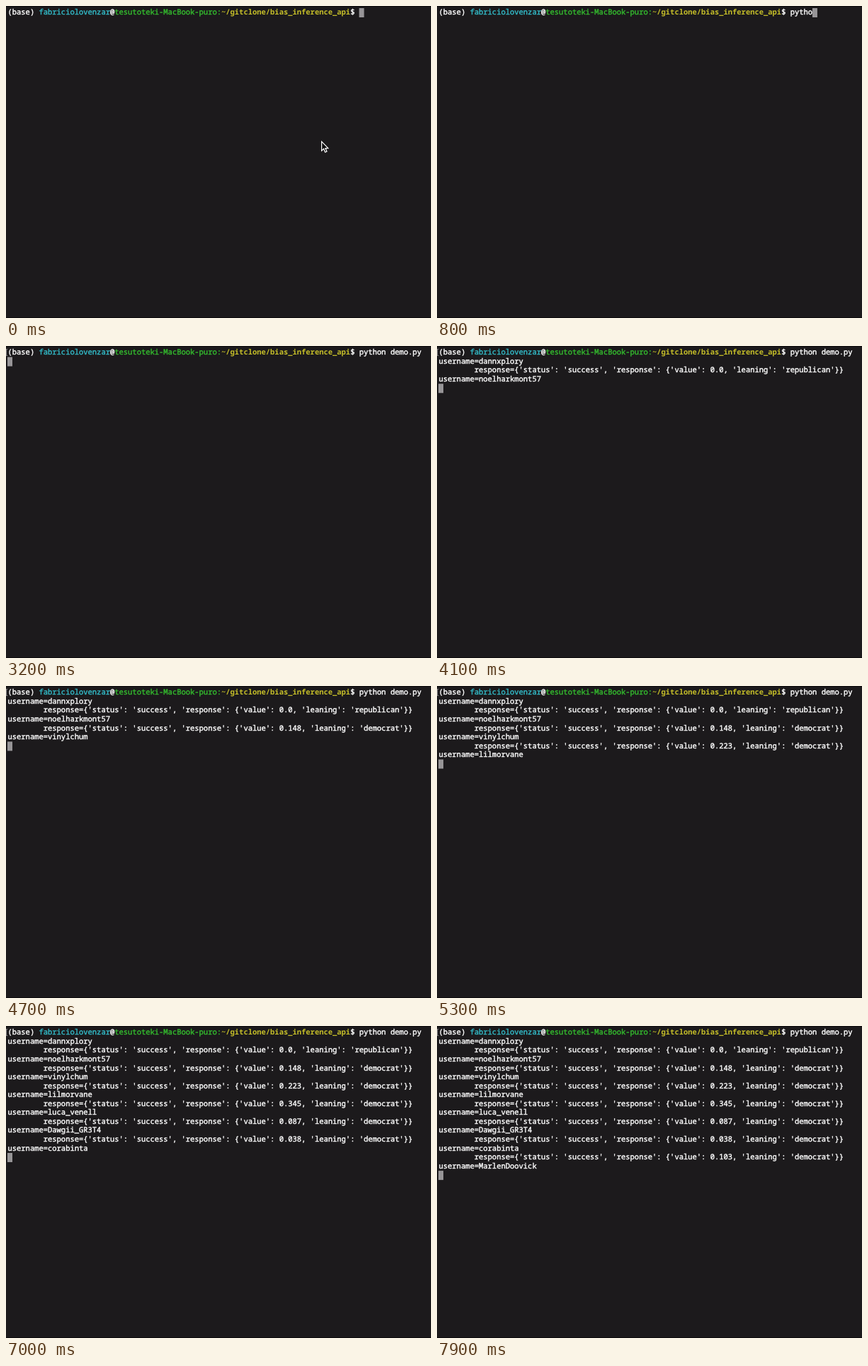
Animation of 600x440 px, one loop 8 s. Source, as an HTML page:

```html
<!DOCTYPE html>
<html lang="en">
<head>
<meta charset="utf-8">
<title>Terminal demo</title>
<style>
  html, body { margin: 0; width: 100%; height: 100%; overflow: hidden; background: #1c1a1c; }
  #stage {
    position: relative; width: 600px; height: 440px; overflow: hidden;
    background: #1c1a1c; box-shadow: inset 0 1px #0c0b0c, inset 0 -1px #0c0b0c;
  }
  pre {
    position: absolute; left: 2.5px; top: 3.3px; margin: 0;
    font: 400 10.475px/12.57px "Noto Sans Mono", "DejaVu Sans Mono", monospace;
    color: #fff; -webkit-text-stroke: .4px; text-rendering: geometricPrecision;
    font-kerning: none; font-variant-ligatures: none;
  }
  .user { color: #33bbc8; }
  .host { color: #34bc2e; }
  .path { color: #c5be29; font-weight: 700; -webkit-text-stroke: 0; }
  #cursor {
    position: absolute; left: 2.2px; top: 2.7px;
    width: 6.7px; height: 13px; background: #979597;
  }
  svg { position: absolute; left: 0; top: 0; }
</style>
</head>
<body>
<div id="stage">
  <div id="cursor"></div>
  <pre>(base) <span class="user">fabriciolovenzar</span>@<span class="host">tesutoteki-MacBook-puro:</span><span class="path">~/gitclone/bias_inference_api</span>$ <span id="typed"></span>
<span id="out"></span></pre>
  <svg width="600" height="440" fill="none">
    <path id="mark" d="M2.2 4.5H.5V13.5H2.2" stroke="#8d8b8d"/>
    <path id="pointer" d="M445.6 191.2V204.2L448.6 201.4L450.6 206.2L452.9 205.2L450.9 200.6H454.8Z"
      fill="#0b0a0b" stroke="#fff" stroke-width="1.2"/>
  </svg>
</div>
<script>
const LOOP = 8000, ENTER = 3200, PROMPT_COLS = 79;
const CW = 6.285, LH = 12.57;
const COMMAND = "python demo.py";

// [time, characters typed]
const KEYS = [
  [200, 1], [400, 2], [600, 3], [700, 4], [800, 5], [900, 6], [1000, 7],
  [1300, 8], [1400, 10], [1500, 11], [1900, 12], [2600, 13], [2900, 14]
];

// [time the name is printed, name, value, leaning]
const USERS = [
  [3600, "dannxplory", "0.0", "republican"],
  [3900, "noelharkmont57", "0.148", "democrat"],
  [4600, "vinylchum", "0.223", "democrat"],
  [5300, "lilmorvane", "0.345", "democrat"],
  [5800, "luca_venell", "0.087", "democrat"],
  [6300, "Dawgii_GR3T4", "0.038", "democrat"],
  [6800, "corabinta", "0.103", "democrat"],
  [7400, "MarlenDoovick"]
];

const $ = id => document.getElementById(id);
const show = (id, on) => { $(id).style.display = on ? "" : "none"; };

const reply = ([, , value, leaning]) =>
  `        response={'status': 'success', 'response': {'value': ${value}, 'leaning': '${leaning}'}}`;

// Each reply arrives together with the next name.
function outputAt(t) {
  const shown = USERS.filter(u => u[0] <= t);
  return shown.flatMap((u, i) => {
    const name = "username=" + u[1];
    return i < shown.length - 1 ? [name, reply(u)] : [name];
  });
}

function draw(t) {
  const typed = KEYS.reduce((n, [at, count]) => at <= t ? count : n, 0);
  const lines = outputAt(t);
  const entered = t >= ENTER;
  const col = entered ? 0 : PROMPT_COLS + typed;
  const row = entered ? 1 + lines.length : 0;
  $("typed").textContent = COMMAND.slice(0, typed);
  $("out").textContent = lines.join("\n");
  $("cursor").style.transform = `translate(${col * CW}px, ${row * LH}px)`;
  show("mark", entered);
  show("pointer", t < 200);
}

function tick() {
  draw(performance.now() % LOOP);
  requestAnimationFrame(tick);
}
tick();
</script>
</body>
</html>
```
